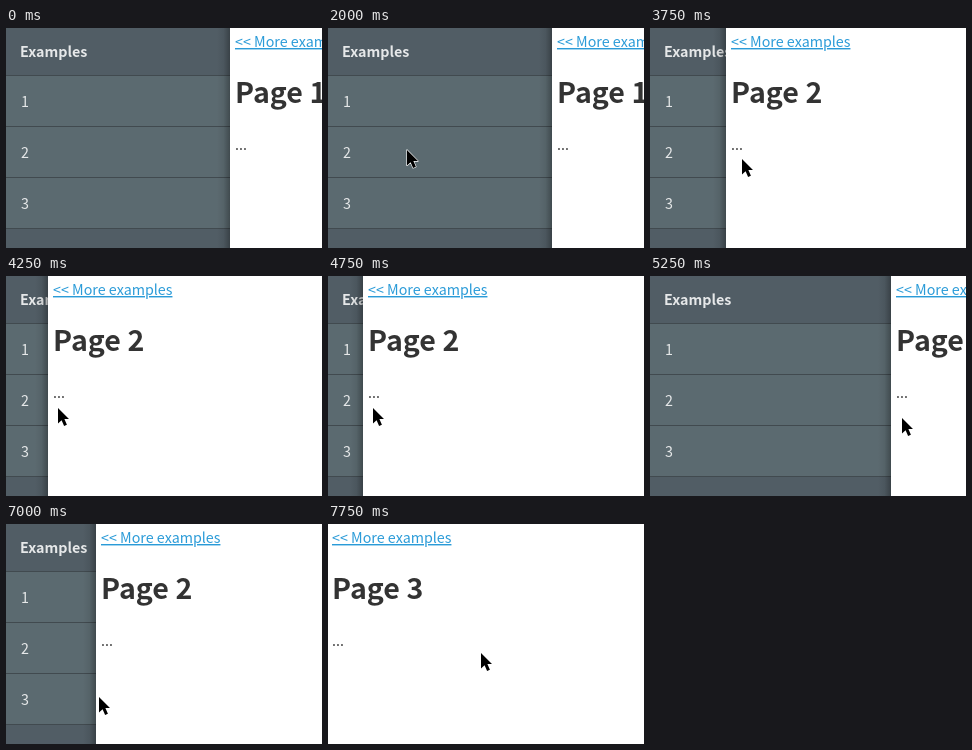
An HTML page for the animation above (8 s loop, 316x220 px).

```html
<!DOCTYPE html>
<html lang="en">
<head>
<meta charset="utf-8">
<title>Sliding menu</title>
<style>
  html, body { margin: 0; width: 100%; height: 100%; overflow: hidden; background: #fff; }
  svg { display: block; width: 316px; height: 220px; }
  text { font: 14.3px "Noto Sans CJK SC", "Noto Sans CJK JP", "Open Sans", sans-serif; fill: #333; }
  .menu text { fill: #e6e8e9; }
  .menu .title { font-weight: 700; }
  .page .link { fill: #2a9bd8; text-decoration: underline; }
  .page .head { font-size: 28.6px; font-weight: 700; }
</style>
</head>
<body>
<svg viewBox="0 0 316 220">
  <defs>
    <linearGradient id="shade">
      <stop offset="0" stop-color="#000" stop-opacity="0"/>
      <stop offset=".5" stop-color="#000" stop-opacity=".07"/>
      <stop offset="1" stop-color="#000" stop-opacity=".3"/>
    </linearGradient>
  </defs>
  <g class="menu">
    <rect width="316" height="220" fill="#515d65"/>
    <rect y="47" width="316" height="154" fill="#5b6a70"/>
    <path d="M0 47.5h316M0 98.5h316M0 149.5h316M0 200.5h316" stroke="#414a4f"/>
    <text class="title" x="14" y="29">Examples</text>
    <text x="15" y="79">1</text>
    <text x="15" y="130">2</text>
    <text x="15" y="181">3</text>
  </g>
  <g class="page" id="page">
    <rect x="-13" width="13" height="220" fill="url(#shade)"/>
    <rect width="320" height="220" fill="#fff"/>
    <text class="link" x="5" y="19">&lt;&lt; More examples</text>
    <text class="head" x="5" y="75">Page <tspan id="number">1</tspan></text>
    <text x="5" y="122">...</text>
  </g>
  <path id="cursor" d="M0 0V15.5L3.6 12.2L6.1 18L8.9 16.8L6.4 11.1H11Z"
    fill="#000" stroke="#fff" stroke-width="1.2" stroke-linejoin="round" paint-order="stroke"/>
</svg>
<script>
  const STEP = 250, STEPS = 32;
  const CLOSED = -1, OPEN = 224;

  // [step, x] of the page's left edge
  const slide = [
    [0, OPEN], [8, OPEN], [9, 90], [10, CLOSED], [11, CLOSED], [12, 12],
    [14, 64], [15, 76], [16, 62], [17, 42], [18, 32], [19, 35], [20, 108],
    [21, 241], [22, 232], [23, OPEN], [27, OPEN], [28, 90], [29, CLOSED]
  ];
  // [step, x, y] of the pointer's tip
  const pointer = [
    [2, 250, 165], [4, 203, 150], [5, 203, 150], [8, 79, 122], [9, 79, 124],
    [11, 12, 130], [12, 24, 130], [14, 78, 130], [15, 92, 131], [16, 73, 131],
    [17, 52, 132], [18, 42, 132], [19, 45, 132], [20, 120, 135], [21, 252, 142],
    [22, 248, 146], [27, 93, 171], [28, 93, 173], [30, 43, 130], [31, 153, 129]
  ];

  const [page, number, cursor] = ["page", "number", "cursor"].map(id => document.getElementById(id));

  function sample(track, step) {
    const next = track.findIndex(key => key[0] > step);
    if (next < 0) return track[track.length - 1].slice(1);
    const b = track[next], a = track[next - 1] || b;
    const k = a === b ? 0 : (step - a[0]) / (b[0] - a[0]);
    return a.slice(1).map((v, i) => v + (b[i + 1] - v) * k);
  }

  function move(node, x, y = 0) {
    node.setAttribute("transform", `translate(${Math.round(x)} ${Math.round(y)})`);
  }

  let start, shown;
  function draw(now) {
    start ??= now;
    const step = Math.floor((now - start) / STEP) % STEPS;
    if (step !== shown) {
      shown = step;
      move(page, ...sample(slide, step));
      move(cursor, ...sample(pointer, step));
      cursor.setAttribute("visibility", step < 2 ? "hidden" : "visible");
      number.textContent = step < 10 ? 1 : step < 29 ? 2 : 3;
    }
    requestAnimationFrame(draw);
  }
  draw(performance.now());
</script>
</body>
</html>
```
